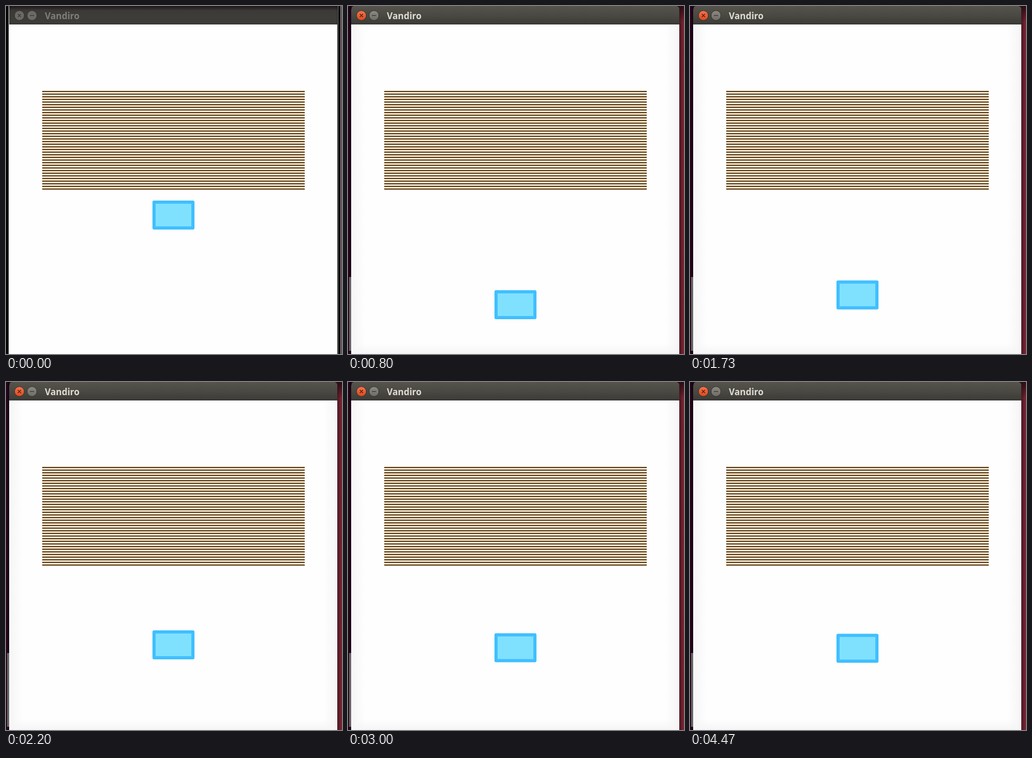
These frames come from a looping animation (640x660 px, 4.87 s). An HTML page with a canvas:

```html
<!DOCTYPE html>
<html>
<head>
<meta charset="utf-8">
<style>
  html, body { margin: 0; height: 100%; overflow: hidden; background: #fff; }
  canvas { display: block; }
</style>
</head>
<body>
<canvas id="stage" width="640" height="660"></canvas>
<script>
const ctx = document.getElementById('stage').getContext('2d');
const LOOP = 4870, STEP = 1000 / 15, LAST_STEP = 67;

// Height of the floating box: [time, top, speed]
const path = [
  [70, 369, 0], [800, 539, .14], [1140, 562, 0], [1730, 521, -.115],
  [2200, 471, -.06], [2560, 461, 0], [3000, 476.4, .035],
  [3560, 487, 0], [4470, 477.5, 0]
];

function boxTop(t) {
  if (t <= path[0][0]) return path[0][1];
  const i = path.findIndex(p => p[0] >= t);
  if (i < 0) return path[path.length - 1][1];
  const [t0, y0, v0] = path[i - 1], [t1, y1, v1] = path[i];
  const d = t1 - t0, u = (t - t0) / d, s = u * u * (3 - 2 * u);
  return y0 + (y1 - y0) * s + d * u * (1 - u) * (v0 * (1 - u) - v1 * u);
}

function rect(x, y, w, h, fill) {
  ctx.fillStyle = fill;
  ctx.fillRect(x, y, w, h);
}

function gradient(x0, y0, x1, y1, ...colors) {
  const g = ctx.createLinearGradient(x0, y0, x1, y1);
  colors.forEach((c, i) => g.addColorStop(i / (colors.length - 1), c));
  return g;
}

function button(x, fill, ink, isClose) {
  ctx.beginPath();
  ctx.arc(x, 18, 9.3, 0, 7);
  ctx.fillStyle = fill;
  ctx.fill();
  ctx.lineWidth = 1;
  ctx.strokeStyle = '#33322e';
  ctx.stroke();
  ctx.beginPath();
  if (isClose) {
    ctx.moveTo(x - 3, 15); ctx.lineTo(x + 3, 21);
    ctx.moveTo(x + 3, 15); ctx.lineTo(x - 3, 21);
  } else {
    ctx.moveTo(x - 4, 18); ctx.lineTo(x + 4, 18);
  }
  ctx.lineWidth = 1.5;
  ctx.strokeStyle = ink;
  ctx.stroke();
}

function drawDesktop(active) {
  if (!active) {
    rect(0, 0, 640, 660, '#fefefe');
    rect(0, 0, 5, 660, '#000');
    rect(631, 0, 1.5, 660, '#111');
    rect(633, 0, 4.5, 660, '#000');
    rect(638.5, 0, 1.5, 660, '#2a1018');
    return;
  }
  rect(0, 0, 7, 660, gradient(0, 0, 7, 0, '#29071f', '#12020e'));
  rect(2, 514, 5, 140, '#666365');
  rect(631, 0, 9, 660, gradient(631, 0, 640, 0, '#4b1722', '#7c2633'));
  rect(631, 0, 9, 30, gradient(0, 0, 0, 30, '#2a0d14', '#2a0d1400'));
}

function drawWindow(active) {
  rect(6, 35, 625, 625, '#fefefe');
  if (active) {
    rect(6, 35, 26, 625, gradient(6, 0, 32, 0, '#f5f5f6', '#fefefe'));
    rect(605, 35, 26, 625, gradient(605, 0, 631, 0, '#fefefe', '#f5f5f6'));
    rect(6, 640, 625, 20, gradient(0, 640, 0, 660, '#f5f5f600', '#f5f5f6'));
  }
  ctx.beginPath();
  ctx.roundRect(6, 0, 625, 35, active ? [8, 8, 0, 0] : 0);
  ctx.fillStyle = active
    ? gradient(0, 0, 0, 35, '#55534b', '#4a4943', '#3b3a36')
    : gradient(0, 0, 0, 35, '#1c1517', '#3c3a38', '#3d3c39', '#3d3c39', '#3b3a37');
  ctx.fill();
  rect(6, 34, 625, 1, '#302f2c');
  button(25.5, active ? gradient(0, 9, 0, 27, '#f2734d', '#df4a1c') : '#6c6a66',
    active ? '#5a2010' : '#3c3b38', true);
  button(49.5, active ? gradient(0, 9, 0, 27, '#8b8980', '#706e66') : '#6c6a66',
    '#3c3b38', false);
  ctx.font = 'bold 17px "Noto Sans", "Open Sans", sans-serif';
  ctx.fillStyle = active ? '#dfdbd2' : '#807d78';
  ctx.fillText('Vandiro', 74, 24.5);
}

function drawStripes() {
  rect(69, 161, 500, 187.5, '#fff8e6');
  for (let i = 0; i < 38; i++) rect(69, 161 + i * 5, 500, 2.3, '#5c3a12');
}

function drawBox(y) {
  ctx.beginPath();
  ctx.rect(282, y + 3, 74, 49);
  ctx.fillStyle = '#80e1ff';
  ctx.fill();
  ctx.lineWidth = 6;
  ctx.lineJoin = 'round';
  ctx.strokeStyle = '#40bfff';
  ctx.stroke();
}

function frame(now) {
  const step = Math.min(LAST_STEP, Math.floor((now % LOOP + 4) / STEP));
  const active = step >= 2;
  drawDesktop(active);
  drawWindow(active);
  drawStripes();
  drawBox(boxTop(step * STEP));
  requestAnimationFrame(() => frame(performance.now() - start));
}

const start = performance.now();
frame(0);
</script>
</body>
</html>
```
